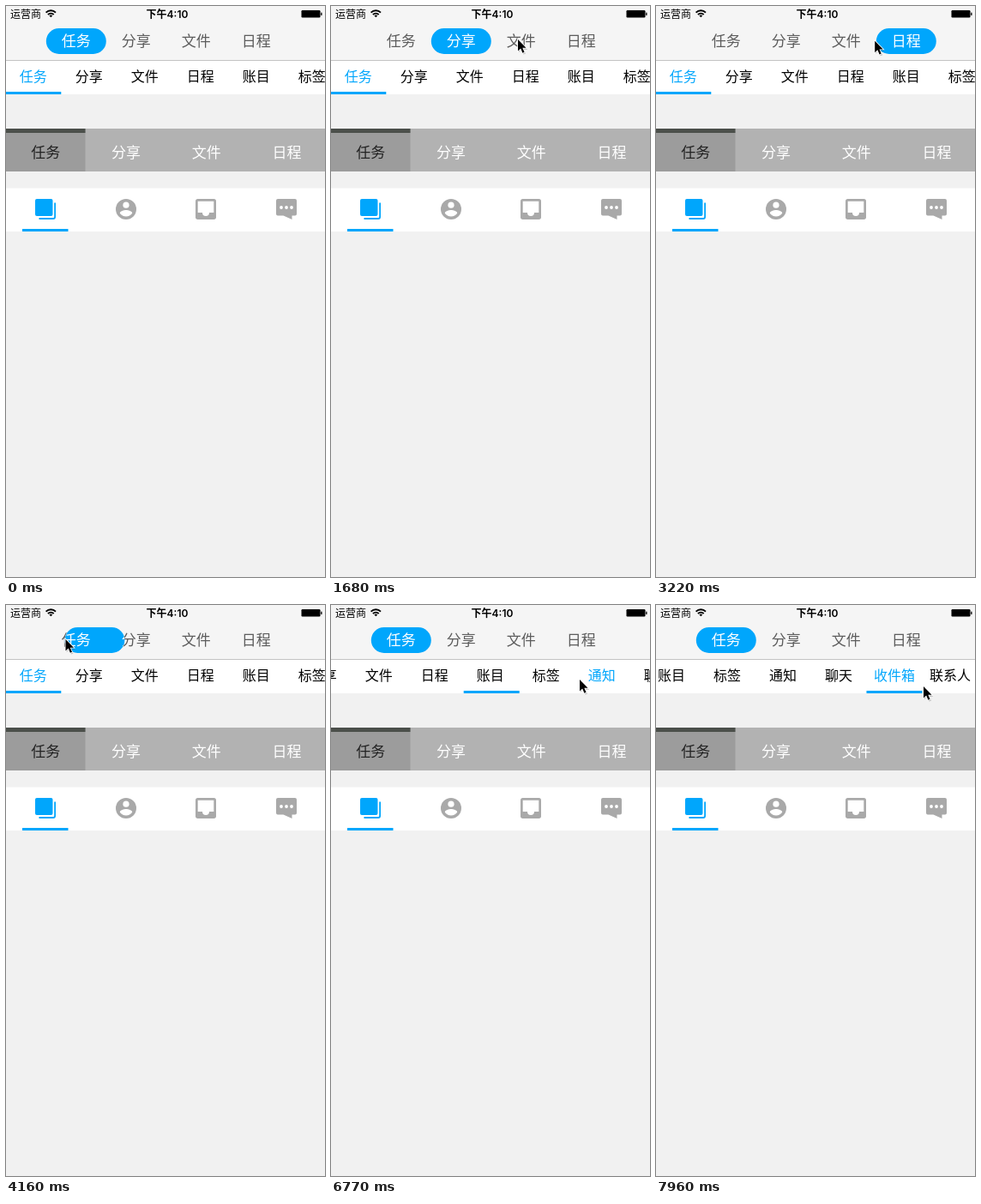
These frames come from a looping animation (372x666 px, 8000 ms). An HTML page:

```html
<!DOCTYPE html>
<html lang="zh-CN">
<head>
<meta charset="utf-8">
<title>Segmented controls</title>
<style>
  html, body { margin: 0; width: 100%; height: 100%; overflow: hidden; background: #f1f1f1; }
  svg { display: block; width: 372px; height: 666px; }
  text { font-family: "Noto Sans CJK SC", "Noto Sans CJK", sans-serif; text-anchor: middle; }
  .nav { font-size: 17px; }
  .tab { font-size: 16px; }
  .status { font-size: 12px; }
  .clock { font: 600 12px Inter, "Noto Sans CJK SC", "Noto Sans CJK", sans-serif; }
</style>
</head>
<body>
<svg viewBox="0 0 372 666">
  <defs>
    <clipPath id="pillClip"><rect id="pillHole" y="26" width="70" height="30" rx="15"/></clipPath>
  </defs>
  <rect width="372" height="666" fill="#f1f1f1"/>

  <rect width="372" height="63" fill="#f5f5f5"/>
  <rect y="63" width="372" height="1" fill="#c4c4c4"/>
  <text class="status" x="23" y="13.5">运营商</text>
  <g fill="none" stroke="#000" stroke-width="1.9">
    <path d="M46.6 7.6a8.2 8.2 0 0 1 11.4 0"/>
    <path d="M48.9 10a5 5 0 0 1 6.8 0"/>
  </g>
  <path d="M50.4 11.3a2.8 2.8 0 0 1 3.8 0L52.3 13.3Z"/>
  <text class="clock" x="188" y="13.5">下午4:10</text>
  <rect x="344.5" y="5" width="22" height="8.5" rx="1.2"/>
  <rect x="367.2" y="7.5" width="1.3" height="3.5" rx=".6"/>

  <g id="navDark" class="nav" fill="#5c5c5c"></g>
  <rect id="pill" y="26" width="70" height="30" rx="15" fill="#00a6fc"/>
  <g clip-path="url(#pillClip)"><g id="navLight" class="nav" fill="#fff"></g></g>

  <rect y="64" width="372" height="39" fill="#fff"/>
  <g id="tabs" class="tab">
    <rect id="bar" y="100" width="65" height="3" fill="#00a6fc"/>
  </g>

  <rect y="143" width="372" height="50" fill="#b2b2b2"/>
  <rect y="143" width="92.5" height="50" fill="#9c9c9c"/>
  <rect y="143" width="92.5" height="5" fill="#4b4f4a"/>
  <g id="blocks" class="nav" fill="#fff"></g>

  <rect y="212.5" width="372" height="50.5" fill="#fff"/>
  <rect x="19" y="260" width="53.5" height="3" fill="#00a6fc"/>
  <rect x="34" y="225" width="20.5" height="20" rx="2" fill="#00a6fc"/>
  <path d="M57.100 229.500V246a2 2 0 0 1-2 2H38.500" fill="none" stroke="#00a6fc" stroke-width="1.800"/>
  <g fill="#a9a9a9">
    <circle cx="140" cy="237" r="12"/>
    <rect x="221" y="225" width="24" height="24" rx="2.7"/>
    <path d="M317 225h20a2 2 0 0 1 2 2v15.500a2 2 0 0 1-2 2h-3.500v4.500l-10-4.500H317a2 2 0 0 1-2-2V227a2 2 0 0 1 2-2Z"/>
  </g>
  <g fill="#fff">
    <circle cx="140" cy="232.2" r="3.6"/>
    <path d="M132.800 241.800c0-2.400 4.800-3.700 7.200-3.700s7.200 1.300 7.200 3.700c-1.600 2.300-4.200 3.800-7.200 3.800s-5.600-1.500-7.200-3.800Z"/>
    <path d="M223.700 227.700h18.600V241H237a4 4 0 0 1-8 0h-5.300Z"/>
    <circle cx="321" cy="235" r="1.9"/><circle cx="327" cy="235" r="1.9"/><circle cx="333" cy="235" r="1.9"/>
  </g>

  <g id="cursor">
    <path d="M1 2V15L4 12l2.500 5.500 2.600-1.100L6.700 12h4.600Z" opacity=".2"/>
    <path d="M0 0V13.500L3.200 10.600 5.400 15.700 7.500 14.800 5.300 9.800H9.500Z" stroke="#fff" stroke-width="1.600" paint-order="stroke"/>
  </g>
</svg>
<script>
const LOOP = 8000, STEP = 118.4;
const VIEW = 375, CROP = 0.7, TAB = 65, SEGMENT = 70;
const NAV_LEFT = (VIEW - 4 * SEGMENT) / 2 - CROP;

const $ = id => document.getElementById(id);
const clamp = (v, lo, hi) => Math.min(hi, Math.max(lo, v));
const mix = (a, b, u) => a + (b - a) * u;
const ease = (t, start, end) => {
  const u = clamp((t - start) / (end - start), 0, 1);
  return u * u * (3 - 2 * u);
};

const names = ['任务', '分享', '文件', '日程', '账目', '标签', '通知', '聊天', '收件箱', '联系人'];

// pointer moves, each optionally followed by a tap on the pill row or the tab row
const moves = [
  { from: 480, to: 1090, x: 168, y: 38, tap: 1240, pill: 1 },
  { from: 1440, to: 1680, x: 218, y: 39, tap: 2070, pill: 2 },
  { from: 2060, to: 2510, x: 265, y: 40, tap: 2660, pill: 3 },
  { from: 3150, to: 3690, x: 69.5, y: 40, tap: 3930, pill: 0 },
  { from: 4280, to: 4760, x: 87, y: 77 },
  { from: 4760, to: 5230, x: 160, y: 93, tap: 5450, tab: 2 },
  { from: 5420, to: 5860, x: 268, y: 93, tap: 6160, tab: 4 },
  { from: 6400, to: 6770, x: 290, y: 87, tap: 6760, tab: 6 },
  { from: 7000, to: 7720, x: 312, y: 95, tap: 7690, tab: 8 }
];
const entry = { x: 320, y: 64 };

function label(parent, str, x, y) {
  const el = document.createElementNS('http://www.w3.org/2000/svg', 'text');
  el.textContent = str;
  el.setAttribute('x', x);
  el.setAttribute('y', y);
  $(parent).append(el);
  return el;
}

names.slice(0, 4).forEach((name, i) => {
  const x = NAV_LEFT + SEGMENT * (i + 0.5);
  label('navDark', name, x, 47);
  label('navLight', name, x, 47);
  label('blocks', name, VIEW / 4 * (i + 0.5) - CROP, 176.5);
});
$('blocks').firstChild.setAttribute('fill', '#222');
const tabs = names.map((name, i) => label('tabs', name, TAB * (i + 0.5), 87.5));

const picked = (row, t) => moves.reduce((i, m) => row in m && m.tap <= t ? m[row] : i, 0);

// value of place(index), eased from tap to tap
const follow = (row, t, dur, place) => moves.reduce(
  (v, m) => row in m ? mix(v, place(m[row]), ease(t, m.tap, m.tap + dur)) : v, place(0));

// each move sags slightly on its way
const pointer = t => moves.reduce((p, m) => {
  const u = ease(t, m.from, m.to);
  return { x: mix(p.x, m.x, u), y: mix(p.y, m.y, u) + 16 * u * (1 - u) };
}, entry);

const scrollFor = i => clamp(TAB * (i + 0.5) - VIEW / 2, 0, TAB * names.length - VIEW);

function draw(now) {
  // the picture refreshes in coarse steps
  const k = Math.floor((now % LOOP - 485) / STEP);
  const t = k < 0 ? 0 : 500 + k * STEP;

  const pillX = follow('pill', t, 300, i => NAV_LEFT + SEGMENT * i);
  for (const id of ['pill', 'pillHole']) $(id).setAttribute('x', pillX);

  const current = picked('tab', t);
  tabs.forEach((el, i) => el.setAttribute('fill', i === current ? '#00a6fc' : '#000'));
  $('bar').setAttribute('x', follow('tab', t, 250, i => TAB * i));
  $('tabs').setAttribute('transform', `translate(${-CROP - follow('tab', t, 300, scrollFor)} 0)`);

  const { x, y } = pointer(t);
  $('cursor').setAttribute('visibility', k < 0 ? 'hidden' : 'visible');
  $('cursor').setAttribute('transform', `translate(${x} ${y})`);
}

function tick() {
  draw(performance.now());
  requestAnimationFrame(tick);
}
tick();
</script>
</body>
</html>
```
